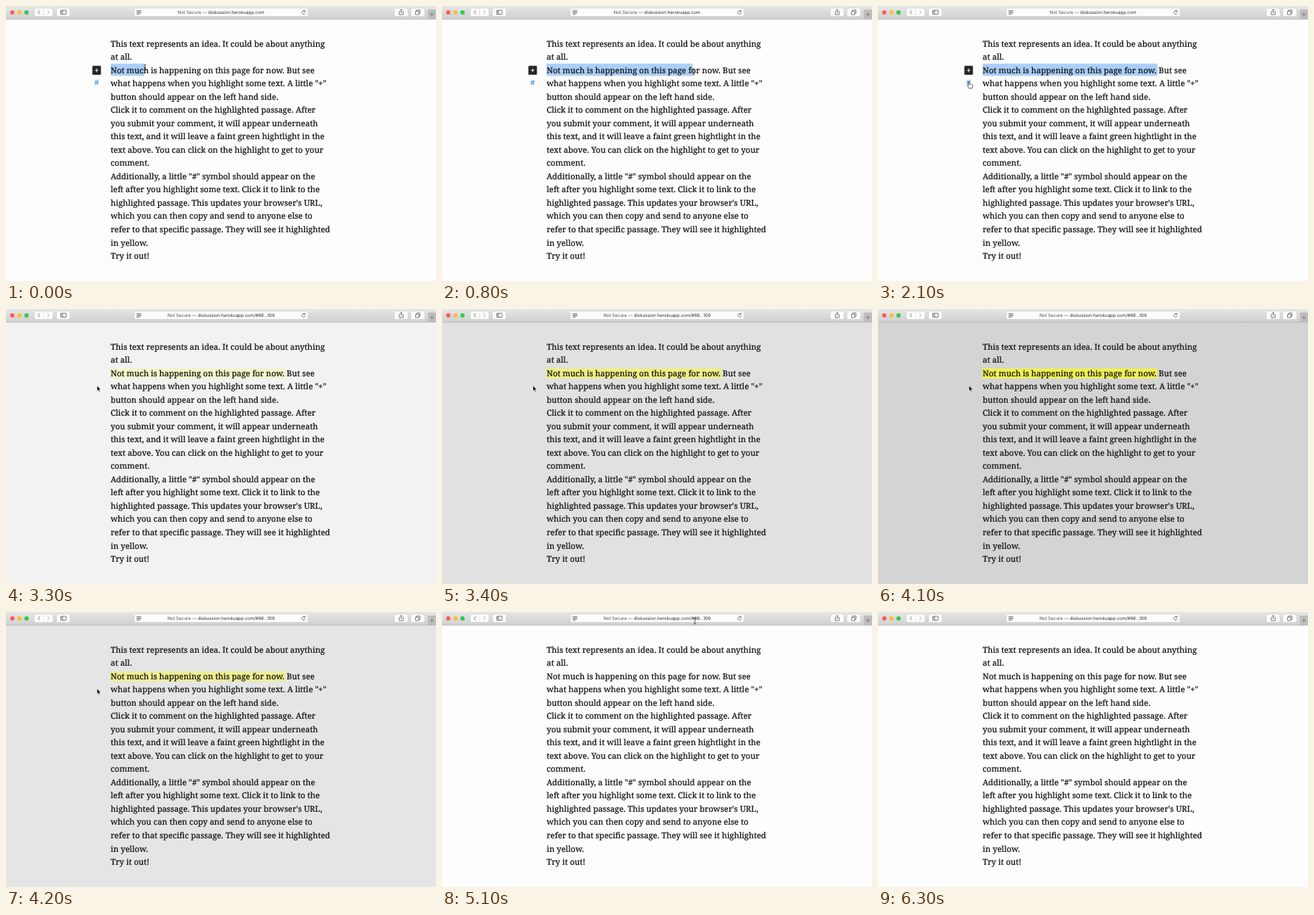
Write an HTML page that moves like this. It is 600 px wide and 384 px high and loops after 6600 ms.

```html
<!DOCTYPE html>
<html lang="en">
<head>
<meta charset="utf-8">
<title>Highlight and link</title>
<style>
  html, body { margin: 0; width: 100%; height: 100%; overflow: hidden; background: #fdfdfd; }
  svg { display: block; width: 600px; height: 384px; }
  text { text-rendering: geometricPrecision; }
  #prose { font-family: "Noto Serif", serif; fill: #111; stroke: #111; stroke-width: .22; }
  .ui { font: 6.2px Inter, sans-serif; text-anchor: middle; fill: #2a2a2a; }
  .ui tspan { fill: #4c4c4c; }
  .btn { fill: #fcfcfc; stroke: #c4c4c4; stroke-width: .5; }
  .icon { fill: none; stroke: #5a5a5a; stroke-width: .8; }

  /* one loop is 6600 ms, updated every 100 ms */
  .anim { animation: 6600ms -4ms infinite step-end; }
  #pointer { animation-name: move; }
  #beam { animation-name: beam; }
  #arrow { animation-name: arrow; }
  #hand { animation-name: hand; }
  #sel { animation-name: select; }
  .glow { animation-name: glow; }
  .before { animation-name: before; }
  .after { animation-name: after; }
  #tools { animation-name: tools; }

  @keyframes move {
    0% { transform: translate(194px, 86px); animation-timing-function: steps(8); }
    12.1212% { transform: translate(351px, 92px); animation-timing-function: steps(4); }
    18.1818% { transform: translate(390px, 91px); }
    21.2121% { transform: translate(390px, 91px); animation-timing-function: steps(5); }
    28.7879% { transform: translate(127px, 106px); }
    43.9394% { transform: translate(127px, 107px); }
    63.6364% { transform: translate(127px, 107px); animation-timing-function: steps(7); }
    74.2424% { transform: translate(345px, 13px); animation-timing-function: steps(7); }
    84.8485% { transform: translate(372px, 11px); animation-timing-function: steps(5); }
    92.4242%, 100% { transform: translate(426px, -12px); }
  }
  @keyframes select {
    0% { width: 47px; animation-timing-function: steps(8); }
    12.1212% { width: 203.5px; animation-timing-function: steps(4); }
    18.1818% { width: 244px; }
    43.9394%, 100% { width: 0; }
  }
  @keyframes glow {
    0% { opacity: 0; }
    46.9697% { opacity: 0; animation-timing-function: steps(2); }
    50% { opacity: .18; animation-timing-function: steps(2); }
    53.0303% { opacity: .7; animation-timing-function: steps(2); }
    56.0606% { opacity: 1; animation-timing-function: steps(3); }
    60.6061% { opacity: .92; animation-timing-function: steps(2); }
    63.6364% { opacity: .38; animation-timing-function: steps(2); }
    66.6667%, 100% { opacity: 0; }
  }
  @keyframes beam {
    0% { opacity: 1; }
    27.2727% { opacity: 0; }
    74.2424%, 100% { opacity: 1; }
  }
  @keyframes arrow {
    0% { opacity: 0; }
    27.2727% { opacity: 1; }
    28.7879% { opacity: 0; }
    43.9394% { opacity: 1; }
    74.2424%, 100% { opacity: 0; }
  }
  @keyframes hand {
    0% { opacity: 0; }
    28.7879% { opacity: 1; }
    43.9394%, 100% { opacity: 0; }
  }
  @keyframes tools { 0% { opacity: 1; } 42.4242%, 100% { opacity: 0; } }
  @keyframes before { 0% { opacity: 1; } 43.9394%, 100% { opacity: 0; } }
  @keyframes after { 0% { opacity: 0; } 43.9394%, 100% { opacity: 1; } }
</style>
</head>
<body>
<svg viewBox="0 0 600 384">
  <defs>
    <linearGradient id="chrome" x2="0" y2="1">
      <stop stop-color="#e6e6e6"/>
      <stop offset="1" stop-color="#d0d0d0"/>
    </linearGradient>
  </defs>

  <rect width="600" height="384" fill="#fdfdfd"/>
  <rect class="anim glow" width="600" height="384" fill-opacity=".25"/>
  <rect id="sel" class="anim" x="146" y="80.5" width="47" height="17" fill="#aacffa"/>
  <rect class="anim glow" x="145.5" y="83" width="244.5" height="14" fill="#ffff10"/>
  <g id="prose"></g>

  <g id="tools" class="anim">
    <rect x="120.5" y="83.5" width="12" height="12.5" rx="1.2" fill="#23272b"/>
    <path d="M124 89.8h5M126.5 87.3v5" stroke="#fff" stroke-width=".9"/>
    <path d="M125.9 103.2l-1 7M128.3 103.2l-1 7M123.7 105.5h5.5M123.3 108h5.5" stroke="#4b8bdc" stroke-width=".9" fill="none"/>
  </g>

  <rect width="600" height="18" fill="url(#chrome)"/>
  <rect y="18" width="600" height=".8" fill="#b4b4b4"/>
  <circle cx="8.8" cy="9" r="3" fill="#fc5b57"/>
  <circle cx="18.7" cy="9" r="3" fill="#fdbc40"/>
  <circle cx="28.6" cy="9" r="3" fill="#34c84a"/>

  <rect class="btn" x="39.5" y="3" width="26" height="11.5" rx="2"/>
  <rect class="btn" x="70.5" y="3" width="19" height="11.5" rx="2"/>
  <rect class="btn" x="179" y="3" width="242.5" height="11.5" rx="2"/>
  <rect class="btn" x="542" y="3" width="19" height="11.5" rx="2"/>
  <rect class="btn" x="565" y="3" width="19" height="11.5" rx="2"/>
  <path d="M52.5 3v11.5" stroke="#d0d0d0" stroke-width=".5"/>
  <g class="icon">
    <path d="M47.3 6l-2.6 2.8 2.6 2.8"/>
    <path d="M57.8 6l2.6 2.8-2.6 2.8" stroke="#a0a0a0"/>
    <path d="M76.5 6h7.4v5.6h-7.4zM79 6v5.6M77.2 7.6h1M77.2 9h1"/>
    <path d="M182.3 6.6h6.4M182.3 8.2h6.4M182.3 9.8h6.4M182.3 11.4h4"/>
    <path d="M416.9 7.2a2.4 2.4 0 1 0 .7 2M417.2 5.5v2h-2"/>
    <path d="M550 7.6h-1.2v4.5h5.4v-4.5H553M551.5 10V4.8M549.9 6.3l1.6-1.6 1.6 1.6"/>
    <path d="M571.4 7.4h4.6v4.6h-4.6zM573 7.2V5.6h4.7v4.7h-1.5"/>
  </g>
  <rect x="588.5" y="5" width="11.5" height="13.3" fill="#bdbdbd"/>
  <path d="M591.5 11.8h5.4M594.2 9.1v5.4" stroke="#666" stroke-width=".7"/>

  <text class="ui anim before" x="300" y="11.2"><tspan>Not Secure —</tspan> diskussion.herokuapp.com</text>
  <text class="ui anim after" x="300" y="11.2"><tspan>Not Secure —</tspan> diskussion.herokuapp.com/#66...109</text>

  <g id="pointer" class="anim">
    <path id="beam" class="anim" d="M-1.7-4.3Q0-4.3 0-3Q0-4.3 1.7-4.3M0-3V3M-1.7 4.3Q0 4.3 0 3Q0 4.3 1.7 4.3" fill="none" stroke="#222" stroke-width=".8"/>
    <path id="arrow" class="anim" d="M0 0V7.6L1.7 6.1 2.9 8.8 4.1 8.3 3 5.6H5.3Z" fill="#111" stroke="#fff" stroke-width=".5"/>
    <path id="hand" class="anim" d="M-.8 .4Q0-.6 .7 .4L1.1 3.4Q2 2.8 2.5 3.6 3.4 3.1 3.9 4 5 3.7 5.1 4.9 5.2 7 4.1 9H-.1Q-.9 7.2-2.4 5.5-2.1 4.3-.6 5.3Z" fill="#fff" stroke="#222" stroke-width=".7"/>
  </g>
</svg>
<script>
  const lines = [
    'This text represents an idea. It could be about anything',
    'at all.',
    'Not much is happening on this page for now. But see',
    'what happens when you highlight some text. A little "+"',
    'button should appear on the left hand side.',
    'Click it to comment on the highlighted passage. After',
    'you submit your comment, it will appear underneath',
    'this text, and it will leave a faint green hightlight in the',
    'text above. You can click on the highlight to get to your',
    'comment.',
    'Additionally, a little "#" symbol should appear on the',
    'left after you highlight some text. Click it to link to the',
    'highlighted passage. This updates your browser\'s URL,',
    'which you can then copy and send to anyone else to',
    'refer to that specific passage. They will see it highlighted',
    'in yellow.',
    'Try it out!'
  ];
  const LEFT = 146, TOP = 56.6, LEADING = 18.53, COLUMN = 306.7;
  const prose = document.getElementById('prose');

  // Type size at which the longest line fills the column.
  const pen = document.createElement('canvas').getContext('2d');
  pen.font = '100px "Noto Serif", serif';
  const longest = Math.max(...lines.map(s => pen.measureText(s).width));
  prose.style.fontSize = (COLUMN / longest * 100).toFixed(2) + 'px';

  lines.forEach((line, i) => {
    const t = document.createElementNS('http://www.w3.org/2000/svg', 'text');
    t.setAttribute('x', LEFT);
    t.setAttribute('y', TOP + i * LEADING);
    t.textContent = line;
    prose.append(t);
  });
</script>
</body>
</html>
```
